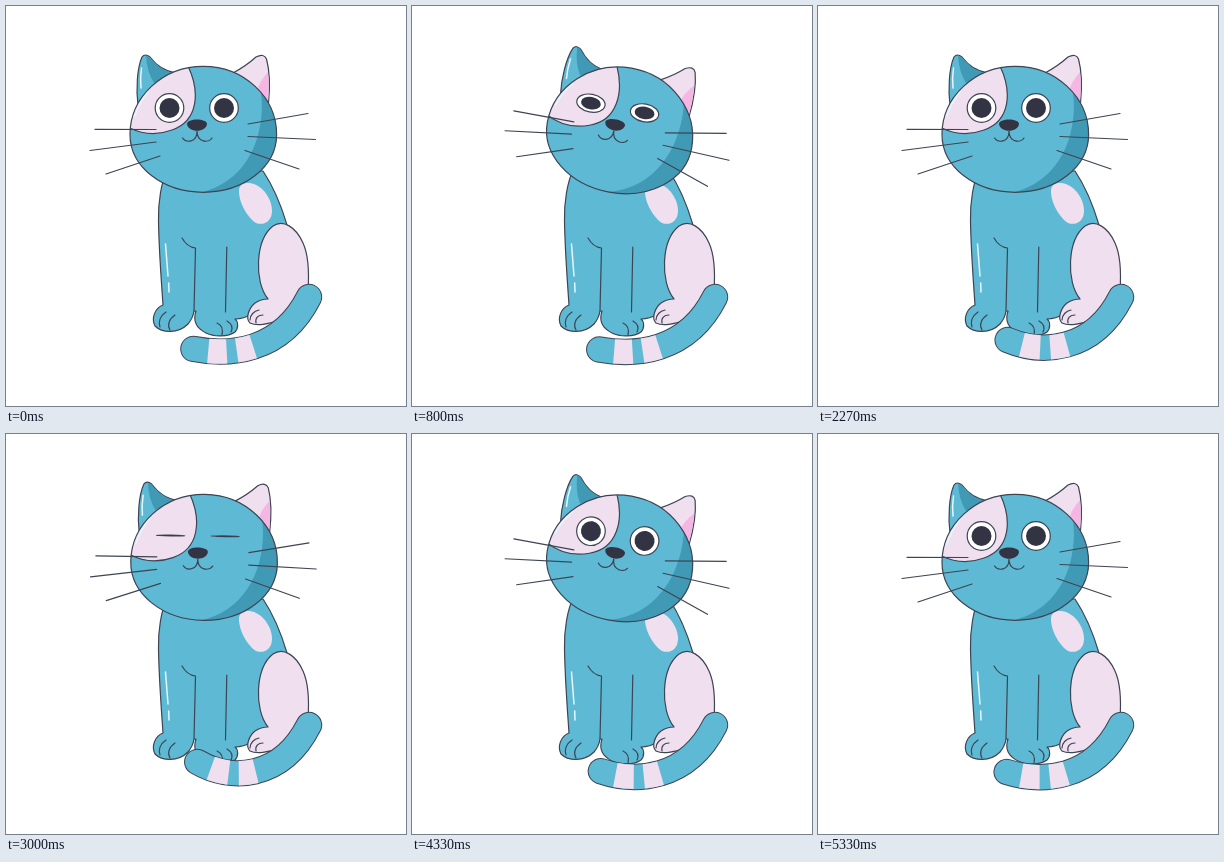
Write an HTML page that moves like this. It is 400 px wide and 400 px high and loops after 5390 ms.

```html
<!DOCTYPE html>
<html lang="en">
<head>
<meta charset="utf-8">
<title>Cat</title>
<style>
  html, body { margin: 0; width: 100%; height: 100%; overflow: hidden; background: #fff; }
  svg { display: block; width: 100vw; height: 100vh; }
  .blue { fill: #5ebad4; }
  .pink { fill: #f0dfef; }
  .shade { fill: #419ab5; }
  .rose { fill: #f6b6e4; }
  .dark { fill: #333443; }
  .white { fill: #fff; }
  .line { stroke: #3d4453; stroke-width: 1.2; stroke-linecap: round; stroke-linejoin: round; }
  .open { fill: none; }
  .shine { fill: none; stroke: #e6f6fa; stroke-width: 1.5; stroke-linecap: round; }
  .tail { fill: none; stroke-linecap: round; }
</style>
</head>
<body>
<svg viewBox="0 0 400 400">
  <defs>
    <path id="skull" d="M197.300 60.300C237.800 60.300 270.600 91 270.600 128.500C270.600 161 237.800 186.300 197.300 186.300C156.800 186.300 124 161 124 128.500C124 91 156.800 60.300 197.300 60.300Z"/>
    <clipPath id="inSkull"><use href="#skull"/></clipPath>
    <path id="curl"/>
  </defs>

  <g id="body">
    <path class="blue line" d="M162 162C155 176 152 197 152.500 215C153 245 155 270 157 299C149 302 145 312 149 320C156 327 172 328 182 318Q187 312 188 305L190 305C187 314 190 322 200 327C208 331 222 331 229 326C233 322 232 315 229 313Q238 313 245 308L283 290L281 219C276 202 269 183 257 165Z"/>
    <path class="pink" d="M233 184C233.500 178 239 176 246 177.500C257 180 266 193 266 205C266 215 258 220 250 217C242 212 232.500 197 233 184Z"/>
    <path class="pink line" d="M262 293C248 276 249 234 267 220C277 213 290 221 297 237C303 250 303 270 302 285C300 300 290 306 275 313C262 319 250 320 244 317C239 312 243 302 249 297Q255 293 262 293Z"/>
    <path class="line open" d="M176 232Q181 241 189.500 242L188 305M220.800 241L219.500 306
      M160 306C154 310 152 316 154 321M169 309C163 313 161 319 164 324
      M211 317C216 319 217 324 216 329M221 315C226 318 227 322 225 326
      M244 314C244 309 248 305 253 304M250 317C249 312 252 309 257 309"/>
    <path class="shine" d="M159.500 238L162 270M162.700 277L163 286"/>
  </g>

  <g class="tail">
    <use href="#curl" stroke="#3d4453" stroke-width="26.400"/>
    <use href="#curl" stroke="#5ebad4" stroke-width="24.400"/>
    <use href="#curl" stroke="#f0dfef" stroke-width="24.400" stroke-linecap="butt" stroke-dasharray="0 15 18.500 10 17 999"/>
  </g>

  <g id="head">
    <path class="blue line" d="M132 99C130 84 131 62 136 51Q139 47 144 51C151 60 158 65 170 67L160 90Z"/>
    <path class="shade" d="M140 50Q142 49.500 144 51.500C151 60 158 65 169 67.300L148 77Q141 66 140 50Z"/>
    <path class="shine" d="M135.500 62Q134 72 135 82"/>
    <path class="pink line" d="M227 67Q240 60 250 51Q258 47 260.500 53C264 66 264 82 262.500 97L240 90Z"/>
    <path class="rose" d="M262 66Q253 76 251 85L262 96Q263.500 80 262 66Z"/>
    <use href="#skull" class="blue"/>
    <g clip-path="url(#inSkull)">
      <path class="shade" d="M255 86C260 128 243 176 193 187L280 200V86Z"/>
      <path class="pink line" d="M181 58C195 86 192 115 166 124C150 130 134 128 120 120L110 50Z"/>
      <path class="shine" d="M129 110Q133 97 142 86"/>
    </g>
    <use href="#skull" class="line open"/>
    <ellipse class="eye white line" cx="163.500" cy="102" rx="14.300"/>
    <ellipse class="eye dark" cx="163.500" cy="102" rx="10"/>
    <ellipse class="eye white line" cx="218" cy="102" rx="14.300"/>
    <ellipse class="eye dark" cx="218" cy="102" rx="10"/>
    <path class="dark" d="M181 118C181 112 201 112 201 118C200 127 182 127 181 118Z"/>
    <path class="line open" d="M176.500 132C180 137 191 137 191 125C191 137 203 137 206 132"/>
    <path class="line open" d="M89 123.300L150 123.500M84 144.500L150 136M100 168L154 150M242 118L302 107.500M242 130.500L309.500 133.500M239 144.500L293 163"/>
  </g>
</svg>
<script>
  const LOOP = 5390, HALF = LOOP / 2, FRAME = LOOP / 81;
  const TILT = [[235, 0], [600, 10.3], [1720, 10.3], [2190, 0]];
  const LIDS = [[140, 1], [285, .03], [325, .03], [480, 1], [730, 1], [890, .03], [920, .03], [1070, 1]];
  const RISE = 1.1;
  const LOWS = [60, 745, 1470, 2095, 2730, 3430, 4195, 4810, LOOP + 60];

  // Tail rises from each low point and falls to the next one.
  const WAG = LOWS.flatMap((low, i) =>
    i ? [[(low + LOWS[i - 1]) / 2, RISE], [low, 0]] : [[low, 0]]);

  const ease = p => (1 - Math.cos(Math.PI * p)) / 2;

  function track(keys, t) {
    if (t <= keys[0][0]) return keys[0][1];
    for (let i = 1; i < keys.length; i++) {
      const [t0, a] = keys[i - 1], [t1, b] = keys[i];
      if (t < t1) return a + (b - a) * ease((t - t0) / (t1 - t0));
    }
    return keys[keys.length - 1][1];
  }

  // The tip curls up while the root stays in place.
  const curlPath = k =>
    `M${187 + 4.5 * k} ${344.5 - 17.5 * k}C${222 + 2 * k} ${350 - 3 * k} 275 ${347 - k} 303 291`;

  const head = document.getElementById('head');
  const curl = document.getElementById('curl');
  const eyes = document.querySelectorAll('.eye');

  function draw() {
    const now = performance.now() % LOOP;
    const t = Math.floor(now / FRAME) * FRAME;
    const beat = t % HALF;
    const lid = track(LIDS, beat);
    head.setAttribute('transform', `rotate(${track(TILT, beat)} 198 185.3)`);
    curl.setAttribute('d', curlPath(track(WAG, t < LOWS[0] ? t + LOOP : t)));
    for (const eye of eyes) eye.setAttribute('ry', eye.getAttribute('rx') * lid);
    requestAnimationFrame(draw);
  }
  draw();
</script>
</body>
</html>
```
